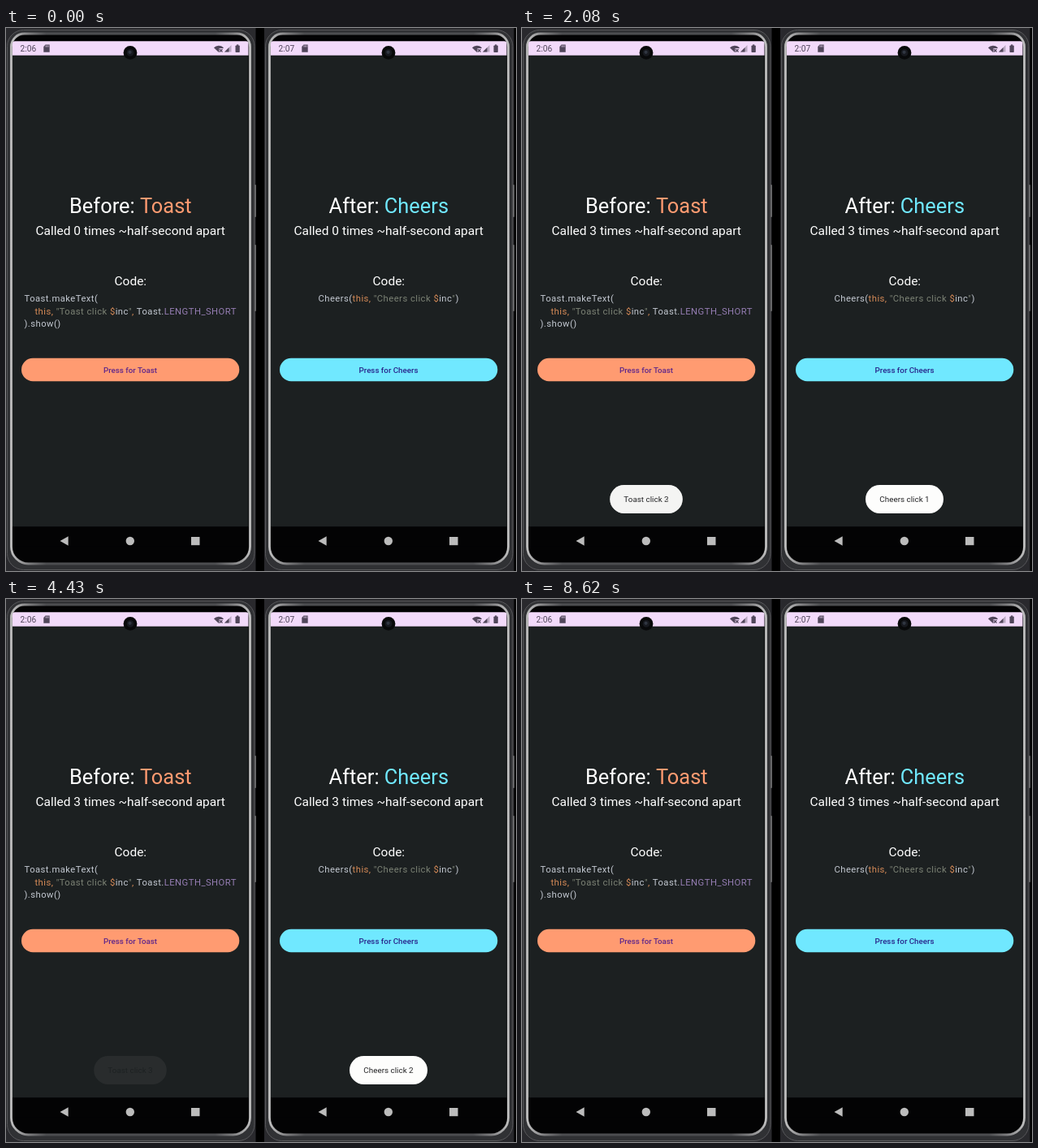
Write an HTML page with a canvas that moves like this. It is 628x669 px and loops after 8.78 s.

```html
<!DOCTYPE html>
<html lang="en">
<head>
<meta charset="utf-8">
<title>Toast and Cheers</title>
<style>
html, body { margin: 0; width: 100%; height: 100%; overflow: hidden; background: #000; }
canvas { display: block; }
</style>
</head>
<body>
<canvas id="stage" width="628" height="669"></canvas>
<script>
const W = 628, H = 669, LOOP = 8780, FADE = 500;
const stage = document.getElementById('stage').getContext('2d');
const CODE = '#c4c9d2', KEY = '#d68a57', STR = '#7c8275', CONST = '#957db3';
const CALLS = [620, 1390, 1930];

const phones = [
  {
    x: 0, clock: '2:06', heading: 'Before: ', name: 'Toast', accent: '#ff9b71', label: '#60278a',
    codeX: 22.5,
    code: [
      [['Toast.makeText(', CODE]],
      [['    this, ', KEY], ['"Toast click ', STR], ['$', KEY], ['inc', CODE], ['"', STR], [', ', KEY],
        ['Toast.', CODE], ['LENGTH_SHORT', CONST]],
      [[').show()', CODE]]
    ],
    boxW: 89.5,
    popups: [[640, 1400], [1400, 1950], [1950, 3945]]
  },
  {
    x: 318, clock: '2:07', heading: 'After: ', name: 'Cheers', accent: '#70e8ff', label: '#28258c',
    codeX: 66.5,
    code: [[['Cheers(', CODE], ['this, ', KEY], ['"Cheers click ', STR], ['$', KEY], ['inc', CODE],
      ['"', STR], [')', CODE]]],
    boxW: 96,
    popups: [[640, 2640], [3480, 5480], [6200, 8120]]
  }
];

function layer(w, h) {
  const canvas = document.createElement('canvas');
  canvas.width = w;
  canvas.height = h;
  return canvas.getContext('2d');
}

function pill(c, x, y, w, h, r, fill, stroke, line = 1) {
  c.beginPath();
  c.roundRect(x, y, w, h, r);
  if (fill) { c.fillStyle = fill; c.fill(); }
  if (stroke) { c.strokeStyle = stroke; c.lineWidth = line; c.stroke(); }
}

function disc(c, x, y, r, fill) {
  c.beginPath();
  c.arc(x, y, r, 0, Math.PI * 2);
  c.fillStyle = fill;
  c.fill();
}

function poly(c, fill, ...points) {
  c.beginPath();
  points.forEach(([x, y]) => c.lineTo(x, y));
  c.fillStyle = fill;
  c.fill();
}

function setFont(c, size, weight = 400, spacing = 0) {
  c.font = `${weight} ${size}px Roboto, sans-serif`;
  c.letterSpacing = spacing + 'px';
}

function centered(c, text, x, y, color) {
  c.textAlign = 'center';
  c.fillStyle = color;
  c.fillText(text, x, y);
  c.textAlign = 'left';
}

function runs(c, parts, x, y) {
  for (const [text, color] of parts) {
    c.fillStyle = color;
    c.fillText(text, x, y);
    x += c.measureText(text).width;
  }
}

function drawShell(c) {
  c.fillStyle = '#29292d';
  c.fillRect(0, 0, 307.5, H);
  pill(c, 305.5, 193, 2.5, 40, 1, '#6a6a6c');
  pill(c, 305.5, 267, 2.5, 82, 1, '#6a6a6c');
  pill(c, 1.5, 2.5, 304.5, 665, 20, '#303134', '#58585b');
  // Metal rim: bright along the sides and corners, dim across the middle.
  const rim = c.createLinearGradient(5, 0, 302, 0);
  rim.addColorStop(0, '#c2c2c2');
  rim.addColorStop(0.08, '#7c7c7e');
  rim.addColorStop(0.15, '#4c4d50');
  rim.addColorStop(0.85, '#4c4d50');
  rim.addColorStop(0.92, '#7c7c7e');
  rim.addColorStop(1, '#c2c2c2');
  pill(c, 6.5, 7, 294, 653, [16, 16, 21, 21], '#030304', rim, 2.8);
}

function drawStatus(c, clock) {
  const ink = '#51465b', paper = '#f2dafa';
  pill(c, 8, 16.3, 290.5, 17.5, [3, 3, 0, 0], paper);
  setFont(c, 10.2);
  c.fillStyle = ink;
  c.fillText(clock, 17.5, 29);
  poly(c, ink, [48.5, 20.5], [53.7, 20.5], [53.7, 29.7], [46.3, 29.7], [46.3, 23]);
  c.fillStyle = paper;
  for (let i = 0; i < 3; i++) c.fillRect(48.6 + i * 1.6, 21.5, 0.7, 2);

  c.beginPath();
  c.moveTo(262, 30);
  c.arc(262, 30, 8.3, -Math.PI * 0.76, -Math.PI * 0.24);
  c.fillStyle = ink;
  c.fill();
  c.fillStyle = paper;
  c.fillRect(262.5, 25, 5, 6);
  c.strokeStyle = ink;
  c.lineWidth = 1.2;
  c.beginPath();
  c.moveTo(263, 26);
  c.lineTo(266.5, 29.5);
  c.moveTo(266.5, 26);
  c.lineTo(263, 29.5);
  c.stroke();
  poly(c, '#b9a8c1', [269, 29.5], [277.5, 21], [277.5, 29.5]);
  poly(c, ink, [269, 29.5], [274.5, 24], [274.5, 29.5]);
  pill(c, 282.5, 21.5, 5.3, 8.5, 0.8, ink);
  c.fillStyle = ink;
  c.fillRect(284, 20.4, 2.3, 1.5);

  disc(c, 153, 30.4, 8.4, '#08090a');
  disc(c, 153, 30.4, 4.4, '#17191f');
  disc(c, 152.6, 29.8, 2.1, '#303641');
}

function drawPhone(c, phone) {
  c.save();
  c.translate(phone.x, 0);
  drawShell(c);
  c.fillStyle = '#1c2021';
  c.fillRect(8, 33.8, 290.5, 580.7);
  c.fillStyle = '#030304';
  c.fillRect(8, 614.5, 290.5, 24);
  drawStatus(c, phone.clock);

  setFont(c, 25.4);
  const width = c.measureText(phone.heading + phone.name).width;
  runs(c, [[phone.heading, '#fff'], [phone.name, phone.accent]], 153.3 - width / 2, 228);
  setFont(c, 15.5);
  centered(c, 'Code:', 153.3, 317, '#fff');
  setFont(c, 11.28, 400, 0.45);
  phone.code.forEach((line, i) => runs(c, line, phone.codeX, 337.3 + i * 15.5));

  pill(c, 19, 406.8, 268.3, 28.4, 14.2, phone.accent);
  setFont(c, 9.75, 500);
  centered(c, 'Press for ' + phone.name, 153, 424.7, phone.label);

  poly(c, '#bcbcbc', [66.5, 632], [76.7, 626.2], [76.7, 637.8]);
  disc(c, 152.8, 632, 5.2, '#bcbcbc');
  c.fillStyle = '#bcbcbc';
  c.fillRect(228, 627, 10.5, 10.2);
  c.restore();
}

function makePopup(phone, number) {
  const c = layer(120, 40);
  pill(c, 60 - phone.boxW / 2, 3, phone.boxW, 35, 17.5, '#fdfdfc');
  setFont(c, 9.87);
  centered(c, `${phone.name} click ${number}`, 60, 24, '#252527');
  return c.canvas;
}

const clamp = v => Math.max(0, Math.min(1, v));

// Decelerating entrance, accelerating exit.
function opacity(t, start, end) {
  const enter = 1 - (1 - clamp((t - start) / FADE)) ** 2;
  const leave = 1 - clamp((t - end) / FADE) ** 2;
  return Math.min(enter, leave);
}

const backdrop = layer(W, H);
backdrop.fillStyle = '#000';
backdrop.fillRect(0, 0, W, H);
for (const phone of phones) {
  drawPhone(backdrop, phone);
  phone.sprites = phone.popups.map((_, i) => makePopup(phone, i + 1));
}

function draw(t) {
  stage.drawImage(backdrop.canvas, 0, 0);
  const count = CALLS.filter(at => t >= at).length;
  for (const phone of phones) {
    setFont(stage, 15.5);
    centered(stage, `Called ${count} times ~half-second apart`, phone.x + 153.2, 255, '#fff');
    phone.popups.forEach(([start, end], i) => {
      stage.globalAlpha = opacity(t, start, end);
      stage.drawImage(phone.sprites[i], phone.x + 93, 560);
    });
    stage.globalAlpha = 1;
  }
}

const begin = performance.now();
function tick() {
  draw((performance.now() - begin) % LOOP);
  requestAnimationFrame(tick);
}
tick();
</script>
</body>
</html>
```
